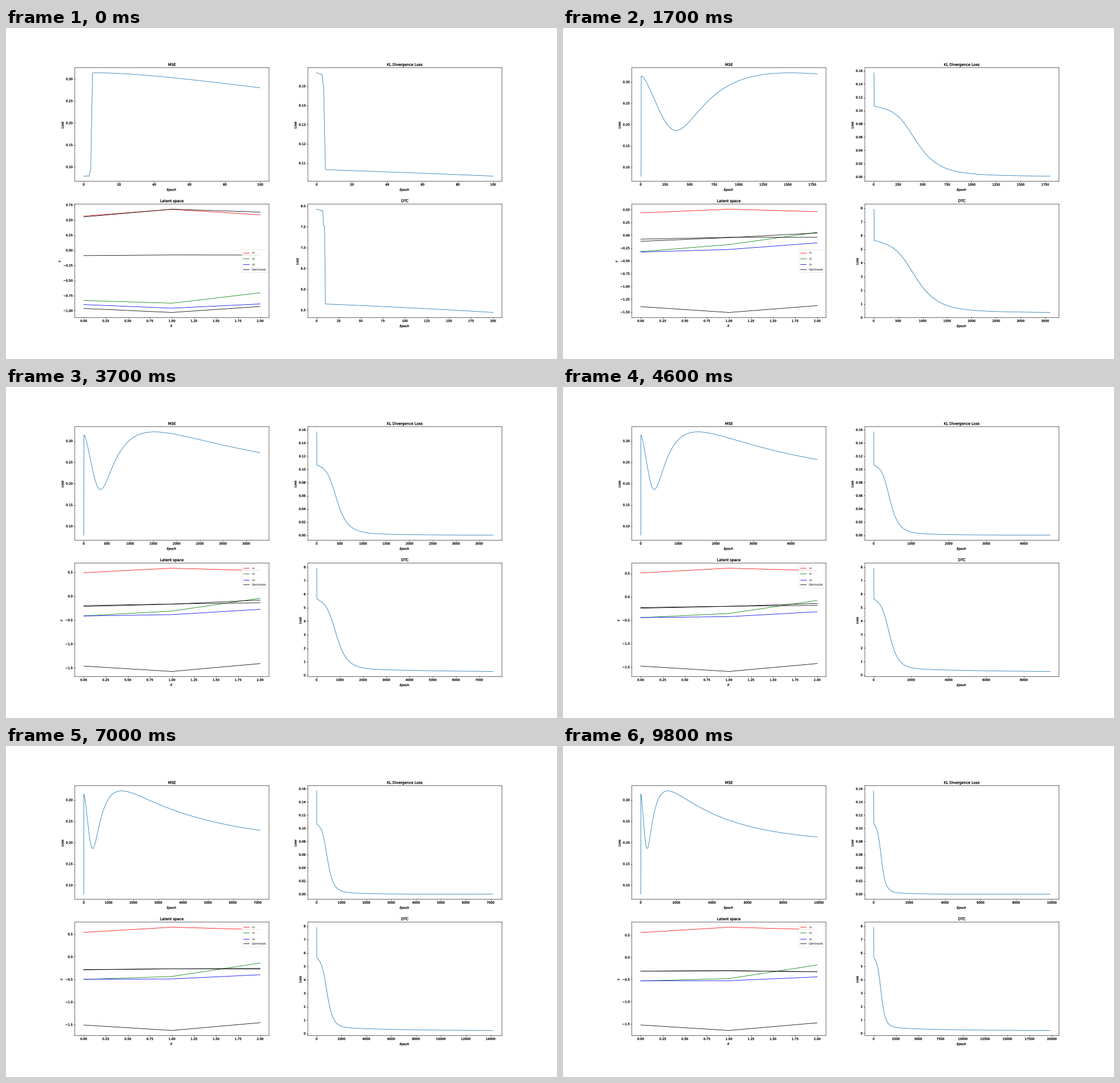
A matplotlib script for the animation above (9.9 s loop, 966 px wide and 580 px high).

```python
import numpy as np
import matplotlib.pyplot as plt
from matplotlib.animation import FuncAnimation
from matplotlib.patheffects import Stroke

WIDTH, HEIGHT, DPI = 966, 580, 38.64
FRAMES, INTERVAL = 99, 100
STEP = 100                      # epochs added per frame
LAST = FRAMES * STEP
SETTLED = 18 * STEP             # the clusters have merged by this epoch
KL_WEIGHT = 50

plt.rcParams["text.hinting"] = "none"


def mse_curve(e):
    """Slow exponential decay with a dip that fades in and out."""
    decay = 0.2 + 0.2104 * np.exp(-2.8e-4 * e)
    rise = -1.683 + 0.0077 * (np.hypot(e, 28) - 28) + 3e-6 * e**2
    return decay - 0.62 * np.exp(-0.0024 * e) / (1 + np.exp(-rise))


def kl_curve(e):
    """Smooth drop around epoch 470 with a thin tail."""
    drop = 0.1068 * np.exp(-e / 2800) / (1 + (e / 470)**4)
    return drop + 0.0014 * (e / 800) * np.exp(1 - e / 800)


# The first five epochs are a warm-up before the smooth curves set in.
later = np.arange(5, LAST + 1, dtype=float)
mse = np.r_[[0.079] * 4, 0.0945, mse_curve(later)]
kl = np.r_[np.linspace(0.1569, 0.1561, 4), 0.1486, kl_curve(later)]
dtc = np.repeat(mse + KL_WEIGHT * kl, 2)

# Poses of each latent line: at the start, when settled, at the end.
CODES = np.array([
    [(.566, .677, .587), (.438, .511, .463), (.558, .680, .625)],
    [(-.830, -.875, -.703), (-.318, -.181, .059), (-.532, -.477, -.172)],
    [(-.898, -.957, -.887), (-.326, -.276, -.147), (-.526, -.525, -.439)],
])
CENTROIDS = np.array([
    [(.552, .680, .632), (-.117, -.044, .046), (-.310, -.300, -.325)],
    [(-.088, -.077, -.079), (-.075, -.039, -.039), (-.310, -.300, -.325)],
    [(-.962, -1.028, -.929), (-1.394, -1.507, -1.374),
     (-1.523, -1.646, -1.474)],
])
CENTROID_EASE = np.array([0.8, 0.9, 1.3])
DIP = 5 + mse[5:].argmin()


def blend(poses, pull, drift):
    start, settled, end = poses.transpose(1, 0, 2)
    return settled + (start - settled) * pull + (end - settled) * drift


def latent_lines(epoch):
    """Codes follow the MSE, centroids follow the KL loss."""
    code_pull = kl_pull = drift = 0
    if epoch < SETTLED:
        code_pull = (mse[SETTLED] - mse[epoch]) / (mse[SETTLED] - mse[DIP])
        code_pull = 1 if epoch <= DIP else max(code_pull, 0)
        kl_pull = (kl[epoch] - kl[SETTLED]) / (kl[STEP] - kl[SETTLED])
    else:
        drift = (mse[SETTLED] - mse[epoch]) / (mse[SETTLED] - mse[LAST])
    return np.vstack([blend(CODES, code_pull, drift),
                      blend(CENTROIDS, kl_pull, drift**CENTROID_EASE)])


def embolden(text):
    text.set_path_effects([Stroke(linewidth=0.55)])


fig, axes = plt.subplots(
    2, 2, figsize=((WIDTH + .01) / DPI, (HEIGHT + .01) / DPI), dpi=DPI)
fig.subplots_adjust(left=.125, right=.9, bottom=.125, top=.88,
                    wspace=.2, hspace=.2)
(ax_mse, ax_kl), (ax_latent, ax_dtc) = axes


def dress(ax, title, xlabel="$Epoch$", ylabel="$Loss$"):
    for text in (ax.set_title(title), ax.set_xlabel(xlabel),
                 ax.set_ylabel(ylabel)):
        embolden(text)
    ax.tick_params(width=1.2)
    for side in ax.spines.values():
        side.set(linewidth=1.1, snap=False)
    for axis in (ax.xaxis, ax.yaxis):
        for tick in axis.get_major_ticks(16):
            embolden(tick.label1)


dress(ax_mse, "MSE")
dress(ax_kl, "KL Divergence Loss")
dress(ax_latent, "Latent space", "$X$", "$Y$")
dress(ax_dtc, "DTC")

losses = [(ax.plot([], [])[0], data, step) for ax, data, step in (
    (ax_mse, mse, STEP), (ax_kl, kl, STEP), (ax_dtc, dtc, 2 * STEP))]

colors = ["red", "green", "blue"] + ["black"] * 3
labels = ["$L_1$", "$L_2$", "$L_3$", "Centroids", None, None]
latent = [ax_latent.plot(range(3), y, color=c, label=s)[0]
          for y, c, s in zip(latent_lines(STEP), colors, labels)]
ax_latent.legend(handles=latent[:4], loc="best", labelspacing=0.36)


def update(frame):
    for line, data, step in losses:
        count = step * (frame + 1) + 1
        line.set_data(np.arange(count), data[:count])
    for line, y in zip(latent, latent_lines(STEP * (frame + 1))):
        line.set_ydata(y)
    for ax in axes.flat:
        ax.relim()
        ax.autoscale_view()
    return []


anim = FuncAnimation(fig, update, frames=FRAMES, interval=INTERVAL,
                     init_func=lambda: update(0), repeat=True,
                     repeat_delay=0, blit=False)
plt.show()
```
